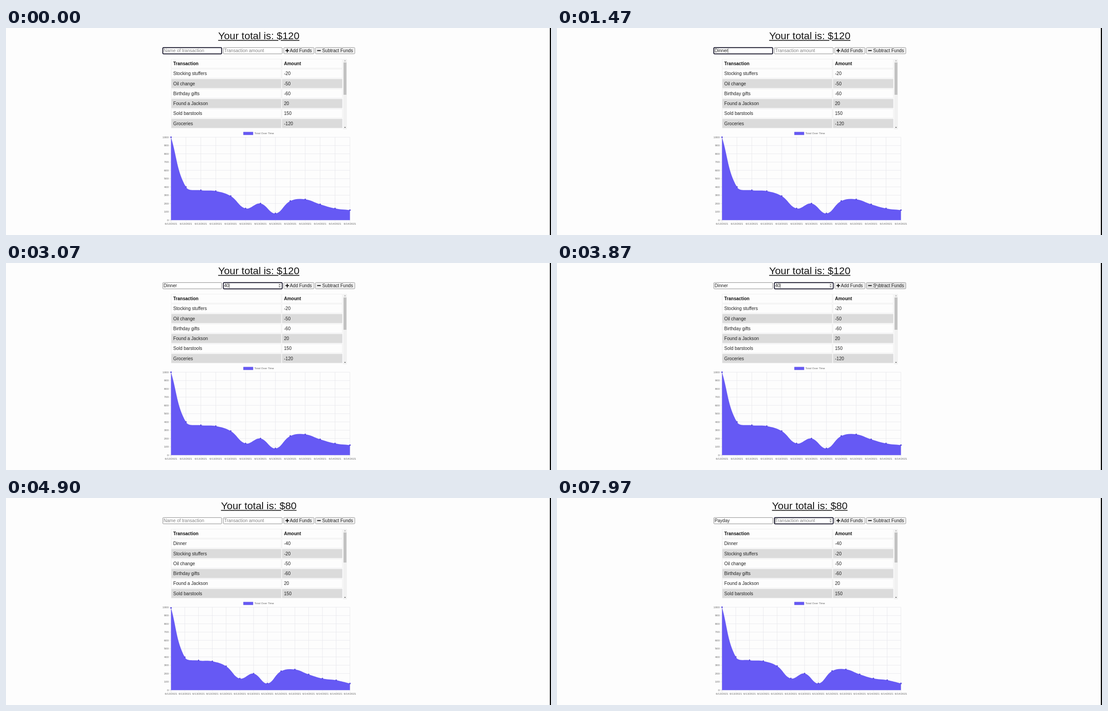
These frames come from a looping animation (1213 px wide and 462 px high, 8 s). An HTML page with a canvas:

```html
<!DOCTYPE html>
<html lang="en">
<head>
<meta charset="utf-8">
<title>Budget tracker</title>
<style>
  html, body { margin: 0; width: 100%; height: 100%; overflow: hidden; background: #fdfdfd; }
  canvas { display: block; width: 1213px; height: 462px; }
</style>
</head>
<body>
<canvas id="stage" width="1213" height="462"></canvas>
<script>
const ctx = document.getElementById('stage').getContext('2d');
const LOOP = 8000;
const SUBMIT = 4200;
const FONT = '"Liberation Sans", Arial, sans-serif';
const PURPLE = '#6659f4';
const PAPER = '#fdfdfd';

const totals = [1000, 400, 360, 350, 290, 140, 200, 80, 230, 250, 190, 140, 120];
const entries = [
  ['Stocking stuffers', -20], ['Oil change', -50], ['Birthday gifts', -60],
  ['Found a Jackson', 20], ['Sold barstools', 150], ['Groceries', -120]
];
const plot = { left: 367.3, right: 765.5, top: 243.8, bottom: 428.7 };

// Time, focused field, name text, amount text
const form = [
  [-700, 'name', '', ''],
  [330, 'name', 'D', ''],
  [560, 'name', 'Di', ''],
  [800, 'name', 'Din', ''],
  [970, 'name', 'Dinn', ''],
  [1130, 'name', 'Dinne', ''],
  [1270, 'name', 'Dinner', ''],
  [1700, 'amount', 'Dinner', ''],
  [2600, 'amount', 'Dinner', '4'],
  [2870, 'amount', 'Dinner', '40'],
  [SUBMIT, '', '', ''],
  [5870, 'name', '', ''],
  [6430, 'name', 'P', ''],
  [6530, 'name', 'Pa', ''],
  [6930, 'name', 'Pay', ''],
  [7030, 'name', 'Payd', ''],
  [7330, 'name', 'Payda', ''],
  [7450, 'name', 'Payday', ''],
  [7770, 'amount', 'Payday', '']
];

function text(str, x, y, size, color = '#222', align = 'left', weight = '') {
  ctx.font = `${weight} ${size}px ${FONT}`;
  ctx.textAlign = align;
  ctx.fillStyle = color;
  ctx.fillText(str, x, y);
}

function rect(x, y, w, h, color) {
  ctx.fillStyle = color;
  ctx.fillRect(x, y, w, h);
}

function box(x, y, w, h, fill, stroke, lineWidth = 1, radius = 1.5) {
  ctx.beginPath();
  ctx.roundRect(x, y, w, h, radius);
  ctx.fillStyle = fill;
  ctx.fill();
  ctx.strokeStyle = stroke;
  ctx.lineWidth = lineWidth;
  ctx.stroke();
}

function line(x1, y1, x2, y2, color, width = 1) {
  ctx.beginPath();
  ctx.moveTo(x1, y1);
  ctx.lineTo(x2, y2);
  ctx.strokeStyle = color;
  ctx.lineWidth = width;
  ctx.stroke();
}

// dir is -1 for up, 1 for down
function arrow(x, y, r, dir, color) {
  ctx.beginPath();
  ctx.moveTo(x - r, y - dir * r / 2);
  ctx.lineTo(x + r, y - dir * r / 2);
  ctx.lineTo(x, y + dir * r / 2);
  ctx.fillStyle = color;
  ctx.fill();
}

function drawTitle(total) {
  const lead = 'Your total is: ';
  const title = lead + '$' + total;
  ctx.font = `22.7px ${FONT}`;
  const width = ctx.measureText(title).width;
  const left = 562.6 - width / 2;
  const dollar = left + ctx.measureText(lead).width + 6.3;
  text(title, left, 25.2, 22.7, '#161616');
  line(left, 27.6, dollar - 2.6, 27.6, '#161616', 1.6);
  line(dollar + 2.6, 27.6, left + width, 27.6, '#161616', 1.6);
}

function drawInput(x, value, placeholder, focused, caretOn) {
  if (focused) box(x, 43.7, 131, 14, '#fff', '#1b1a2e', 1.9, 2);
  else box(x, 43.7, 131, 14, '#fff', '#858585');
  text(value || placeholder, x + 1.7, 54.1, 10.1, value ? '#222' : '#858585');
  if (focused && caretOn) {
    const caret = x + 2 + (value ? ctx.measureText(value).width : 0);
    line(caret, 45.8, caret, 55.8, '#333', 0.8);
  }
}

function drawButton(x, w, label, labelX, plus, hover) {
  box(x, 43.5, w, 14.2, hover ? '#e2e2e2' : '#efefef', '#999', 1, 2);
  const icon = x + 8;
  line(icon - 4, 50.4, icon + 4, 50.4, '#111', 2);
  if (plus) line(icon, 46.4, icon, 54.4, '#111', 2);
  text(label, labelX, 54.1, 10.1);
}

function drawForm(t) {
  const [since, focus, name, amount] = form.filter(s => s[0] <= t).pop();
  const caretOn = (t - since) % 1000 < 500;
  drawInput(349, name, 'Name of transaction', focus === 'name', caretOn);
  drawInput(483.8, amount, 'Transaction amount', focus === 'amount', caretOn);
  if (focus === 'amount') {
    rect(605.5, 45.3, 7, 10.8, '#f0f0f0');
    arrow(609, 48.2, 2, -1, '#444');
    arrow(609, 53.2, 2, 1, '#444');
  }
  drawButton(618, 67.7, 'Add Funds', 631.8, true, false);
  drawButton(688.5, 88, 'Subtract Funds', 703.8, false, t > 3580 && t < 4450);
}

function drawCell(x, y, w, label, shaded, weight) {
  rect(x, y, w, 21, '#e9e9ea');
  rect(x + 0.8, y + 0.8, w - 1.6, 19.4, shaded ? '#dbdbdb' : PAPER);
  text(label, x + 4.9, y + 14.1, weight ? 10 : 10.15, weight ? '#111' : '#222', 'left', weight);
}

function drawTable(rows, thumbEnd) {
  ctx.save();
  ctx.beginPath();
  ctx.rect(366, 68, 394, 158);
  ctx.clip();
  [['Transaction', 'Amount'], ...rows].forEach(([name, amount], i) => {
    const y = 69 + i * 22.25;
    const shaded = i > 0 && i % 2 === 0;
    const weight = i ? '' : 'bold';
    drawCell(367.4, y, 245.6, name, shaded, weight);
    drawCell(613.8, y, 135.2, amount, shaded, weight);
  });
  rect(750.3, 69, 8.4, 157, '#f1f1f1');
  rect(751.3, 77, 6.4, thumbEnd - 77, '#c1c1c1');
  arrow(754.5, 73, 2, -1, '#a3a3a3');
  arrow(754.5, 222, 2, 1, '#505050');
  ctx.restore();
}

function controls(prev, cur, next) {
  const before = Math.hypot(cur.x - prev.x, cur.y - prev.y);
  const after = Math.hypot(next.x - cur.x, next.y - cur.y);
  const tension = 0.4 / (before + after);
  const clampY = y => Math.min(plot.bottom, Math.max(plot.top, y));
  const offset = k => ({
    x: cur.x + k * (next.x - prev.x),
    y: clampY(cur.y + k * (next.y - prev.y))
  });
  return { in: offset(-tension * before), out: offset(tension * after) };
}

function drawChart(values, grow) {
  const { left, right, top, bottom } = plot;
  const step = (right - left) / (values.length - 1);
  const points = values.map((v, i) => ({
    x: left + i * step,
    y: bottom - v / 1000 * (bottom - top)
  }));
  const rise = y => bottom + (y - bottom) * grow;

  box(528.5, 232.2, 21.3, 6.2, PURPLE, '#5a4de0', 0.6, 0);
  text('Total Over Time', 553, 237.1, 6.2, '#666');

  for (let v = 0; v <= 1000; v += 100) {
    const y = bottom - v / 1000 * (bottom - top);
    line(left - 5, y, right, y, v ? '#e5e5ea' : '#cfcfd4', 0.8);
    text(v, 362, y + 2.1, 6.2, '#666', 'right');
  }
  points.forEach((p, i) => {
    line(p.x, top, p.x, bottom + 5, i ? '#e5e5ea' : '#cfcfd4', 0.8);
    text(i < 10 ? '6/13/2021' : '6/14/2021', p.x, 439.2, 6.2, '#666', 'center');
  });

  const handles = points.map((p, i) => controls(points[i - 1] || p, p, points[i + 1] || p));
  ctx.beginPath();
  ctx.moveTo(left, bottom);
  ctx.lineTo(left, rise(points[0].y));
  for (let i = 1; i < points.length; i++) {
    const a = handles[i - 1].out, b = handles[i].in, p = points[i];
    ctx.bezierCurveTo(a.x, rise(a.y), b.x, rise(b.y), p.x, rise(p.y));
  }
  ctx.lineTo(right, bottom);
  ctx.fillStyle = PURPLE;
  ctx.fill();

  ctx.fillStyle = '#5a4de0';
  for (const p of points) {
    ctx.beginPath();
    ctx.arc(p.x, rise(p.y), 1.8, 0, Math.PI * 2);
    ctx.fill();
  }
}

function drawPointer(t) {
  if (t < 3400 || t > 4450) return;
  const k = Math.min(1, (t - 3400) / 300);
  const x = 650 + 60.5 * (1 - (1 - k) ** 3);
  ctx.beginPath();
  ctx.moveTo(x - 0.8, 52.5);
  ctx.lineTo(x - 0.8, 47.5);
  ctx.lineTo(x + 0.8, 47.5);
  ctx.lineTo(x + 0.8, 50.5);
  ctx.lineTo(x + 4, 51.5);
  ctx.lineTo(x + 3.3, 56.5);
  ctx.lineTo(x - 0.5, 56.5);
  ctx.lineTo(x - 2.7, 53);
  ctx.closePath();
  ctx.fillStyle = '#fff';
  ctx.fill();
  ctx.strokeStyle = '#555';
  ctx.lineWidth = 0.7;
  ctx.stroke();
}

function render(t) {
  const done = t >= SUBMIT;
  const progress = done ? Math.min(1, (t - SUBMIT) / 1000) : 1;
  rect(0, 0, 1213, 462, PAPER);
  rect(1210.5, 0, 2.5, 462, '#000');
  drawTitle(done ? 80 : 120);
  drawForm(t);
  drawTable(done ? [['Dinner', -40], ...entries.slice(0, 5)] : entries, done ? 144 : 149);
  drawChart(done ? [...totals, 80] : totals, 1 - (1 - progress) ** 4);
  drawPointer(t);
}

const start = performance.now();
function tick() {
  render((performance.now() - start) % LOOP);
  requestAnimationFrame(tick);
}
tick();
</script>
</body>
</html>
```
